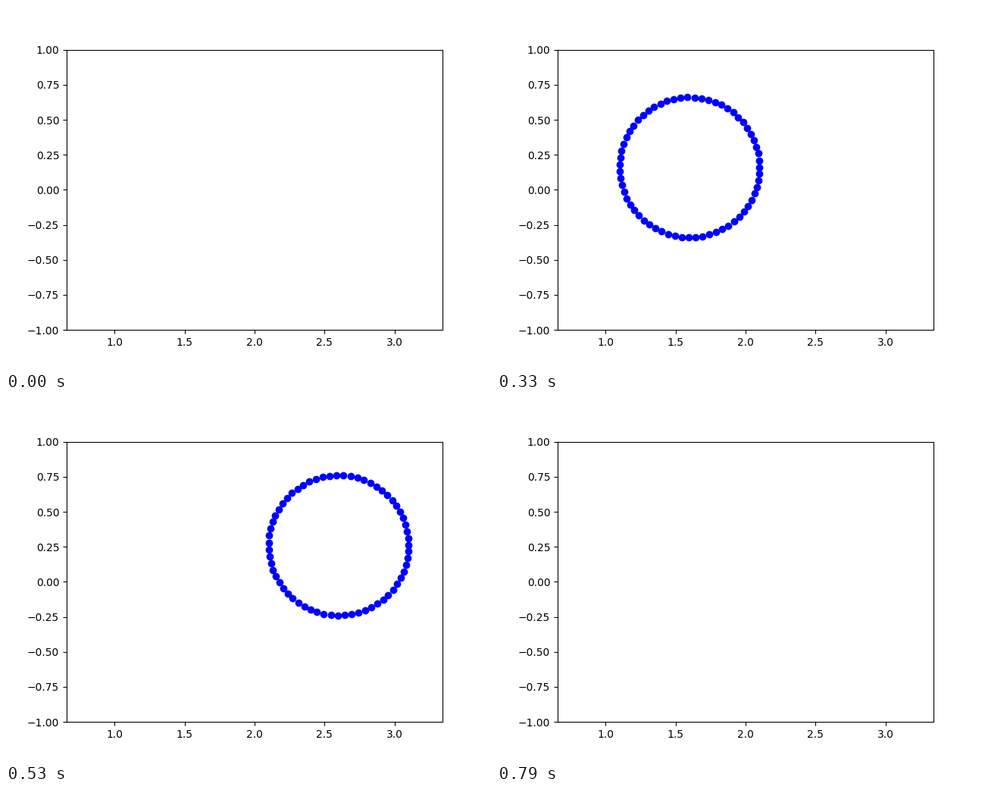
These frames come from a looping animation (640x480 px, 8350 ms). A matplotlib script:

```python
import matplotlib.pyplot as plt
import numpy as np
from matplotlib.animation import FuncAnimation

INTERVAL = 10       # ms per tick
LOOP = 8350         # ms
RADIUS = 0.5
LAST_X = 3.9        # the ring has left the view here

fig, ax = plt.subplots(figsize=(6.4, 4.8), dpi=100)

# Equal scale on both axes, centred on x = 2
box = ax.get_window_extent()
half = box.width / box.height
ax.set(xlim=(2 - half, 2 + half), ylim=(-1, 1))
ax.set_xticks(np.arange(1, 3.1, 0.5))
ax.set_yticks(np.linspace(-1, 1, 9))

# Fixed positions for the empty title and labels keep redraws fast
ax.set_title("", y=1)
ax.xaxis.set_label_coords(0.5, -0.1)
ax.yaxis.set_label_coords(-0.1, 0.5)

theta = np.arange(0, 2 * np.pi, 0.1)
ring_x, ring_y = RADIUS * np.cos(theta), RADIUS * np.sin(theta)
dots, = ax.plot([], [], "bo")


def update(tick):
    # The centre moves 0.1 to the right every second tick, along y = x / 10
    x = min(max(tick - 1, 0) // 2 * 0.1, LAST_X)
    dots.set_data(x + ring_x, x / 10 + ring_y)
    return dots,


anim = FuncAnimation(fig, update, frames=LOOP // INTERVAL, interval=INTERVAL,
                     repeat=True, repeat_delay=0, blit=True)
plt.show()
```
